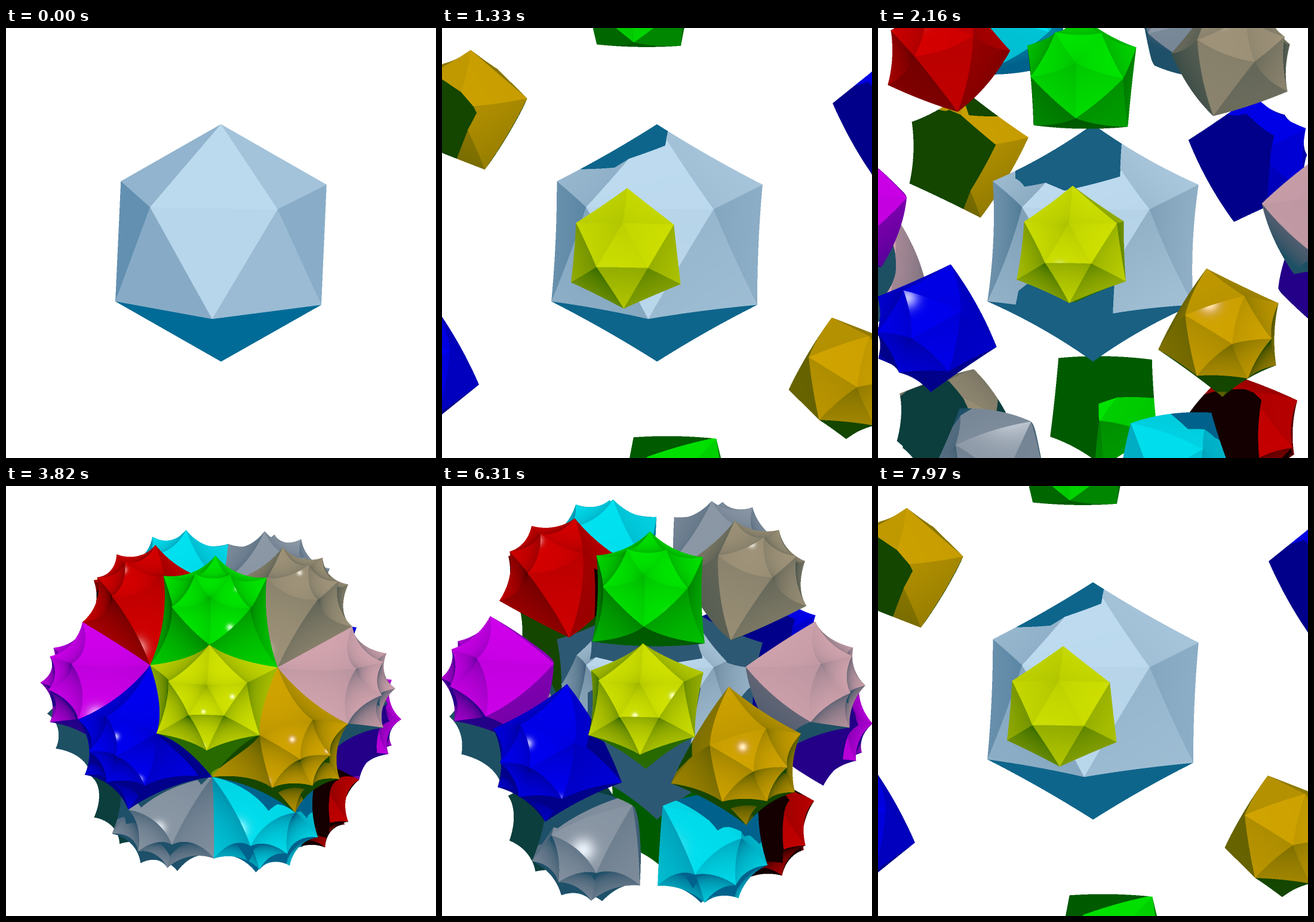
Animation of 720x720 px, one loop 8000 ms. Source, as an HTML page with a canvas:

```html
<!DOCTYPE html>
<html lang="en">
<head>
<meta charset="utf-8">
<title>Hyperbolic icosahedra</title>
<style>
html, body { margin: 0; width: 100%; height: 100%; overflow: hidden; background: #fff; }
canvas { display: block; width: 720px; height: 720px; }
</style>
</head>
<body>
<canvas id="stage" width="720" height="720"></canvas>
<script>
const SIZE = 720, LOOP = 8000, GAMMA = 2.2;
const CORE_PX = 203.3;   // circumradius of the central cell on screen
const EYE = 300;         // camera distance in circumradii of the central cell

// Circumradius of the cells in the Poincare ball, for each pose
const POSES = [0.001, 0.1765, 0.223, 0.325, 0.4815, 0.5988];
// [start time, pose]
const STEPS = [[0, 0], [500, 1], [1330, 2], [2160, 3], [2990, 4], [3820, 5], [6310, 4], [7140, 3], [7970, 2]];

const dot = (a, b) => a[0] * b[0] + a[1] * b[1] + a[2] * b[2];
const sum = (...vs) => [0, 1, 2].map(i => vs.reduce((s, v) => s + v[i], 0));
const scale = (v, k) => v.map(c => c * k);
const unit = v => scale(v, 1 / Math.sqrt(dot(v, v)));

const LIGHT = unit([0.063, -0.397, 0.915]);
const HALF = unit(sum(LIGHT, [0, 0, 1]));

// Colour facing the light, and colour in shadow
const linear = c => c.map(x => Math.pow(x / 255, GAMMA));
const paint = (lit, dark) => {
  const a = linear(dark);
  return { dark: a, gain: linear(lit).map((x, i) => x - a[i]) };
};
// The shadow side of the core turns greyer as the cells close up
const corePaint = v => {
  const k = Math.pow(v / 0.48, 1.5);
  return paint([193, 222, 242], [45 * k, 107 - 19 * k, 150 - 35 * k]);
};
const CAPS = [
  paint([0, 228, 0], [0, 90, 0]),
  paint([212, 0, 0], [20, 0, 0]),
  paint([0, 225, 240], [0, 98, 140]),
  paint([140, 152, 166], [30, 80, 105]),
  paint([158, 146, 120], [12, 62, 62])
];
const BELT = [
  paint([208, 226, 0], [40, 105, 0]),
  paint([208, 0, 235], [35, 0, 135]),
  paint([208, 163, 0], [20, 70, 0]),
  paint([0, 0, 240], [0, 0, 138]),
  paint([212, 165, 175], [30, 80, 100])
];

// Icosahedron: a tilted pole and a ring of five vertices, with their opposites
const pole = unit([-0.0006, -0.9777, 0.21]);
const side = unit([-0.003, 0.21, 0.9777]);
const across = unit([1, 0, 0.003]);
const ring = [0, 1, 2, 3, 4].map(i => {
  const a = (58.5 + 72 * i) * Math.PI / 180, k = 2 / Math.sqrt(5);
  return sum(scale(pole, k / 2), scale(across, k * Math.cos(a)), scale(side, k * Math.sin(a)));
});
const faces = [];
for (let i = 0; i < 5; i++) {
  const a = ring[i], b = ring[(i + 1) % 5], c = scale(ring[(i + 3) % 5], -1);
  const cap = unit(sum(pole, a, b)), belt = unit(sum(a, b, c));
  for (const s of [1, -1]) {
    faces.push({ n: scale(cap, s), paint: CAPS[i] }, { n: scale(belt, s), paint: BELT[i] });
  }
}
const IN_RATIO = dot(faces[0].n, pole);

// A half-space is [Bx, By, Bz, A] with A(|p|^2 + 1) - 2 B.p >= 0 inside
const halfSpace = (n, r) => [...scale(n, Math.cosh(r)), Math.sinh(r)];
const reflect = (w, u) => {
  const s = 2 * (dot(w, u) - w[3] * u[3]);
  return w.map((x, i) => x - s * u[i]);
};
const FIT = Math.acosh(1.40126);   // inradius at which three cells close up round an edge

function makeCells(v) {
  const R = 2 * Math.atanh(v), r = Math.atanh(IN_RATIO * Math.tanh(R));
  const base = faces.map(f => halfSpace(f.n, r));
  const far = Math.tanh(FIT + R / 2), near = Math.tanh(FIT - R / 2);
  const cells = [{ c: [0, 0, 0], r: v, paint: corePaint(v), w: Float64Array.from(base.flat()) }];
  for (const f of faces) {
    const mirror = halfSpace(f.n, FIT);
    cells.push({
      c: scale(f.n, (far + near) / 2),
      r: (far - near) / 2,
      paint: f.paint,
      w: Float64Array.from(base.map(b => reflect(b, mirror)).flat())
    });
  }
  return cells;
}

let hitT = 0, hitFace = -1;

// Move along the ray out of every outer region until inside the cell
function march(cell, ox, oy, oz, dx, dy, dz) {
  const cx = ox - cell.c[0], cy = oy - cell.c[1], cz = oz - cell.c[2];
  const m = cx * dx + cy * dy + cz * dz;
  const q = m * m - cx * cx - cy * cy - cz * cz + cell.r * cell.r;
  if (q <= 0) return false;
  const root = Math.sqrt(q), end = root - m;
  if (end <= 0) return false;
  let t = Math.max(0, -m - root), face = -1, moved = true;
  const w = cell.w, od = ox * dx + oy * dy + oz * dz, oo = ox * ox + oy * oy + oz * oz + 1;
  for (let pass = 0; moved && pass < 12; pass++) {
    moved = false;
    for (let i = 0; i < 80; i += 4) {
      const a = w[i + 3];
      const h = a * od - w[i] * dx - w[i + 1] * dy - w[i + 2] * dz;
      const c = a * oo - 2 * (w[i] * ox + w[i + 1] * oy + w[i + 2] * oz);
      if ((a * t + 2 * h) * t + c >= -1e-9) continue;
      let next = Infinity;
      if (Math.abs(a) < 1e-9) {
        next = -c / (2 * h);
        if (next <= t) return false;
      } else {
        const d = h * h - a * c;
        if (d < 0) return false;
        const s = Math.sqrt(d), t1 = (-h - s) / a, t2 = (-h + s) / a;
        if (t1 > t) next = t1;
        if (t2 > t && t2 < next) next = t2;
      }
      if (next >= end) return false;
      t = next;
      face = i;
      moved = true;
    }
  }
  hitT = t;
  hitFace = face;
  return true;
}

function render(v) {
  const cells = makeCells(v), lift = 0.003 * v, eye = EYE * v;
  const out = new Float32Array(3);
  const [lx, ly, lz] = LIGHT;

  // Writes linear colour to out, returns an id of the visible part
  function trace(px, py) {
    let dx = (px - 360) / (CORE_PX * EYE), dy = (py - 360) / (CORE_PX * EYE);
    const dz = -1 / Math.sqrt(1 + dx * dx + dy * dy);
    dx *= -dz;
    dy *= -dz;
    let best = Infinity, index = -1, face = -1;
    for (let i = 0; i < cells.length; i++) {
      if (march(cells[i], 0, 0, eye, dx, dy, dz) && hitFace >= 0 && hitT < best) {
        best = hitT;
        index = i;
        face = hitFace;
      }
    }
    if (index < 0) {
      out[0] = out[1] = out[2] = 1;
      return 0;
    }
    const cell = cells[index], w = cell.w, a = w[face + 3];
    const x = dx * best, y = dy * best, z = eye + dz * best;
    let nx = w[face] - a * x, ny = w[face + 1] - a * y, nz = w[face + 2] - a * z;
    const len = Math.sqrt(nx * nx + ny * ny + nz * nz);
    nx /= len;
    ny /= len;
    nz /= len;
    let glow = Math.max(0, nx * lx + ny * ly + nz * lz), gloss = 0;
    if (glow > 0) {
      const sx = x + nx * lift, sy = y + ny * lift, sz = z + nz * lift;
      for (const k of cells) {
        if (march(k, sx, sy, sz, lx, ly, lz)) {
          glow = 0;
          break;
        }
      }
    }
    if (glow > 0) {
      gloss = 0.55 * Math.pow(Math.max(0, nx * HALF[0] + ny * HALF[1] + nz * HALF[2]), 800);
    }
    for (let i = 0; i < 3; i++) {
      out[i] = Math.min(1, Math.max(0, cell.paint.dark[i] + cell.paint.gain[i] * glow + gloss));
    }
    return 1 + index * 256 + face * 2 + (glow > 0 ? 1 : 0);
  }

  const image = new ImageData(SIZE, SIZE), data = image.data;
  const ids = new Int32Array(SIZE * SIZE);
  for (let y = 0, p = 0; y < SIZE; y++) {
    for (let x = 0; x < SIZE; x++, p++) {
      ids[p] = trace(x + 0.5, y + 0.5);
      for (let i = 0; i < 3; i++) data[p * 4 + i] = 255 * Math.pow(out[i], 1 / GAMMA);
      data[p * 4 + 3] = 255;
    }
  }
  // Smooth the borders between parts
  for (let y = 1; y < SIZE - 1; y++) {
    for (let x = 1; x < SIZE - 1; x++) {
      const p = y * SIZE + x, id = ids[p];
      if (id === ids[p - 1] && id === ids[p + 1] && id === ids[p - SIZE] && id === ids[p + SIZE]) continue;
      const mix = [0, 0, 0];
      for (let s = 0; s < 4; s++) {
        trace(x + 0.25 + 0.5 * (s & 1), y + 0.25 + 0.5 * (s >> 1));
        for (let i = 0; i < 3; i++) mix[i] += Math.pow(out[i], 1 / GAMMA);
      }
      for (let i = 0; i < 3; i++) data[p * 4 + i] = mix[i] * 255 / 4;
    }
  }
  return image;
}

const ctx = document.getElementById("stage").getContext("2d");
const images = POSES.map(render);
let shown = -1;

function draw(ms) {
  const t = ms % LOOP;
  let pose = 0;
  for (const [at, p] of STEPS) if (t >= at) pose = p;
  if (pose !== shown) {
    ctx.putImageData(images[pose], 0, 0);
    shown = pose;
  }
}

const start = performance.now();
function tick() {
  draw(Math.max(0, performance.now() - start));
  requestAnimationFrame(tick);
}
tick();
</script>
</body>
</html>
```
